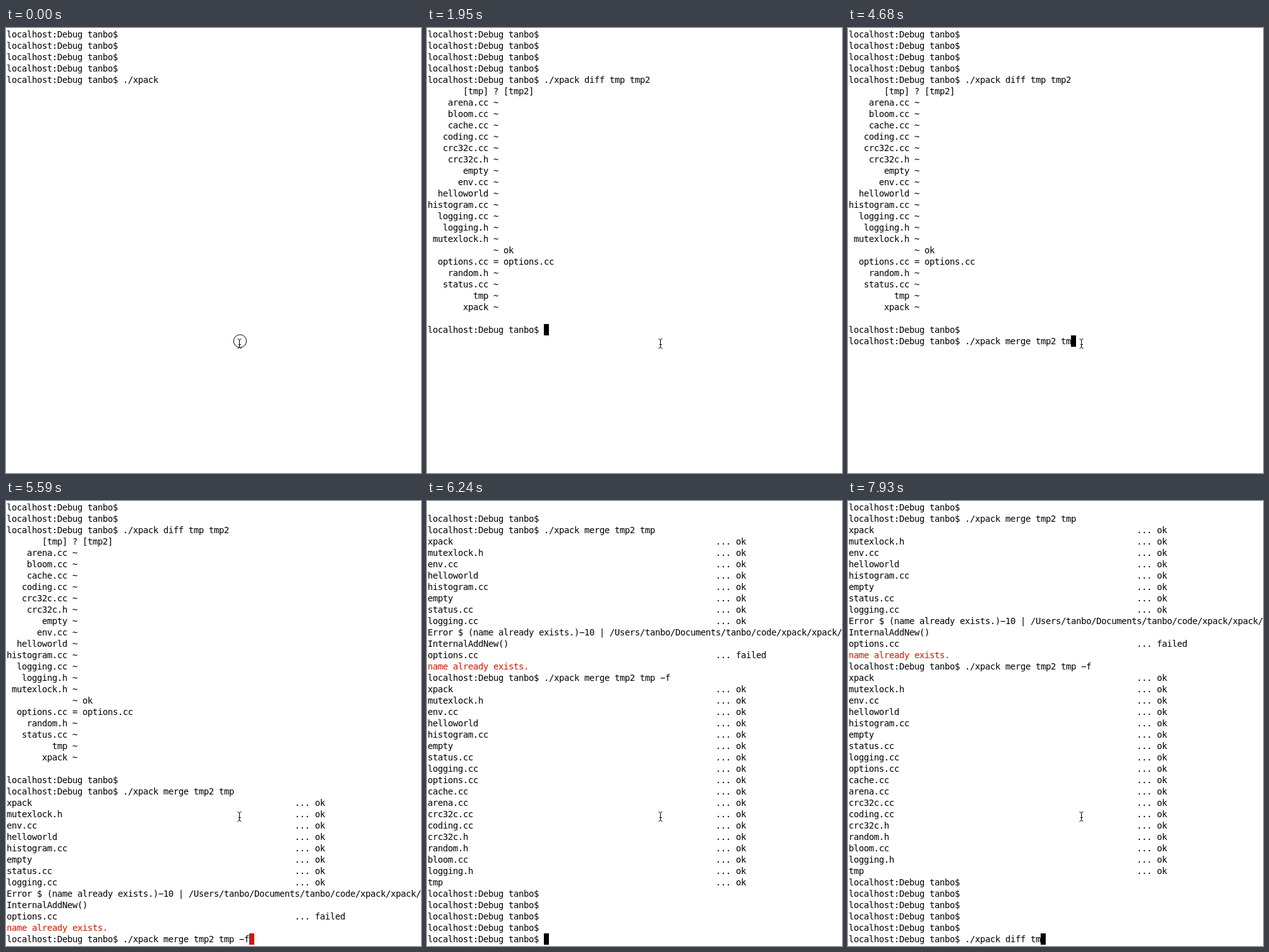
These frames come from a looping animation (657x705 px, 8000 ms). An HTML page:

```html
<!DOCTYPE html>
<html lang="en">
<head>
<meta charset="utf-8">
<title>Terminal session</title>
<style>
  html, body { margin: 0; width: 100%; height: 100%; overflow: hidden; background: #fff; }
  #stage { position: relative; width: 657px; height: 705px; overflow: hidden; background: #fff; color: #000; }
  #screen, #probe {
    position: absolute; left: 1px; top: 1px; margin: 0; white-space: pre;
    font: 14px/18px "DejaVu Sans Mono", "Liberation Mono", monospace;
    font-variant-ligatures: none;
  }
  #probe { visibility: hidden; }
  #screen div { height: 18px; }
  .red { color: #c91b00; }
  #block { position: absolute; width: 8px; height: 18px; background: #000; }
  #block.red { background: #c91b00; }
  svg { position: absolute; left: 0; top: 0; fill: none; stroke: #000; }
</style>
</head>
<body>
<div id="stage">
  <span id="probe"></span>
  <pre id="screen"></pre>
  <div id="block"></div>
  <svg width="657" height="705">
    <circle id="ring" cx="370.5" cy="496" r="10.2"/>
    <path d="M366.5 492.5q2.6 0 3 2.5q.4-2.5 3-2.5M369.5 495V505M366.5 507.5q2.6 0 3-2.5q.4 2.5 3 2.5M368 501.5h4"/>
  </svg>
</div>
<script>
const $ = id => document.getElementById(id);
const CELL = 8, LINE = 18, ROWS = 39, STEP = 130, LOOP = 8000;
const USER = "tanbo";
const PROMPT = `localhost:Debug ${USER}$ `;
const ERROR = "name already exists.";
const cmd = args => PROMPT + "./xpack " + args;
const only = name => name.padStart(12) + " ~";
const result = (name, state = "ok") => name.padEnd(57) + "... " + state;

const merged = ("xpack mutexlock.h env.cc helloworld histogram.cc empty status.cc logging.cc " +
  "options.cc cache.cc arena.cc crc32c.cc coding.cc crc32c.h random.h bloom.cc logging.h tmp").split(" ");
const before = ("arena.cc bloom.cc cache.cc coding.cc crc32c.cc crc32c.h empty env.cc helloworld " +
  "histogram.cc logging.cc logging.h mutexlock.h").split(" ");

// The whole session; prompts not yet reached are cut off by the cursor row.
const session = [
  ...Array(4).fill(PROMPT),
  cmd("diff tmp tmp2"),
  "[tmp]".padStart(12) + " ? [tmp2]",
  ...before.map(only),
  only("") + " ok",
  "options.cc".padStart(12) + " = options.cc",
  ...["random.h", "status.cc", "tmp", "xpack"].map(only),
  "",
  PROMPT,
  cmd("merge tmp2 tmp"),
  ...merged.slice(0, 8).map(n => result(n)),
  `Error $ (${ERROR})\u221210 | /Users/${USER}/Documents/${USER}/code/xpack/xpack/`,
  "InternalAddNew()",
  result("options.cc", "failed"),
  ERROR,
  cmd("merge tmp2 tmp \u2212f"),
  ...merged.map(n => result(n)),
  ...Array(6).fill(PROMPT)
];

// One entry per step: cursor row and the text typed there so far.
const steps = [];
function type(row, ...keys) {
  let text = "";
  for (const key of keys) steps.push({ row, text: text += key });
}
type(4, "./xpack ", "", "", ..."diff tmp ", "tm", "p", "2");
type(26, "");
type(27, "", "", ".", "/", "x", "pack ", "", "m", "", ..."erge tmp2 tmp");
type(40, "", "./xpack merge tmp2 tmp", "", ..." \u2212f");
for (let row = 59; row < 64; row++) type(row, "");
type(64, "", ".", "/", "x", "p", "ack ", ..."diff tm");

const blinkOff = [0, 46], redRow = 40;

function draw(n) {
  const { row, text } = steps[n];
  const top = Math.max(0, row + 1 - ROWS);
  const lines = [...session.slice(top, row), PROMPT + text];
  $("screen").replaceChildren(...lines.map(line => {
    const div = document.createElement("div");
    div.textContent = line;
    if (line === ERROR) div.className = "red";
    return div;
  }));
  const block = $("block");
  block.style.left = 1 + CELL * (PROMPT.length + text.length) + "px";
  block.style.top = 1 + LINE * (row - top) + "px";
  block.style.display = blinkOff.includes(n) ? "none" : "";
  block.className = row === redRow ? "red" : "";
  $("ring").style.display = n < 2 ? "" : "none";
}

// Fit the font's own advance to the terminal cell.
const probe = $("probe");
probe.textContent = "m".repeat(80);
$("screen").style.letterSpacing = CELL - probe.getBoundingClientRect().width / 80 + "px";
probe.remove();

let shown = -1;
const start = performance.now();
function tick() {
  const t = (performance.now() - start) % LOOP;
  const n = Math.min(steps.length - 1, Math.floor(t / STEP));
  if (n !== shown) draw(shown = n);
  requestAnimationFrame(tick);
}
tick();
</script>
</body>
</html>
```
